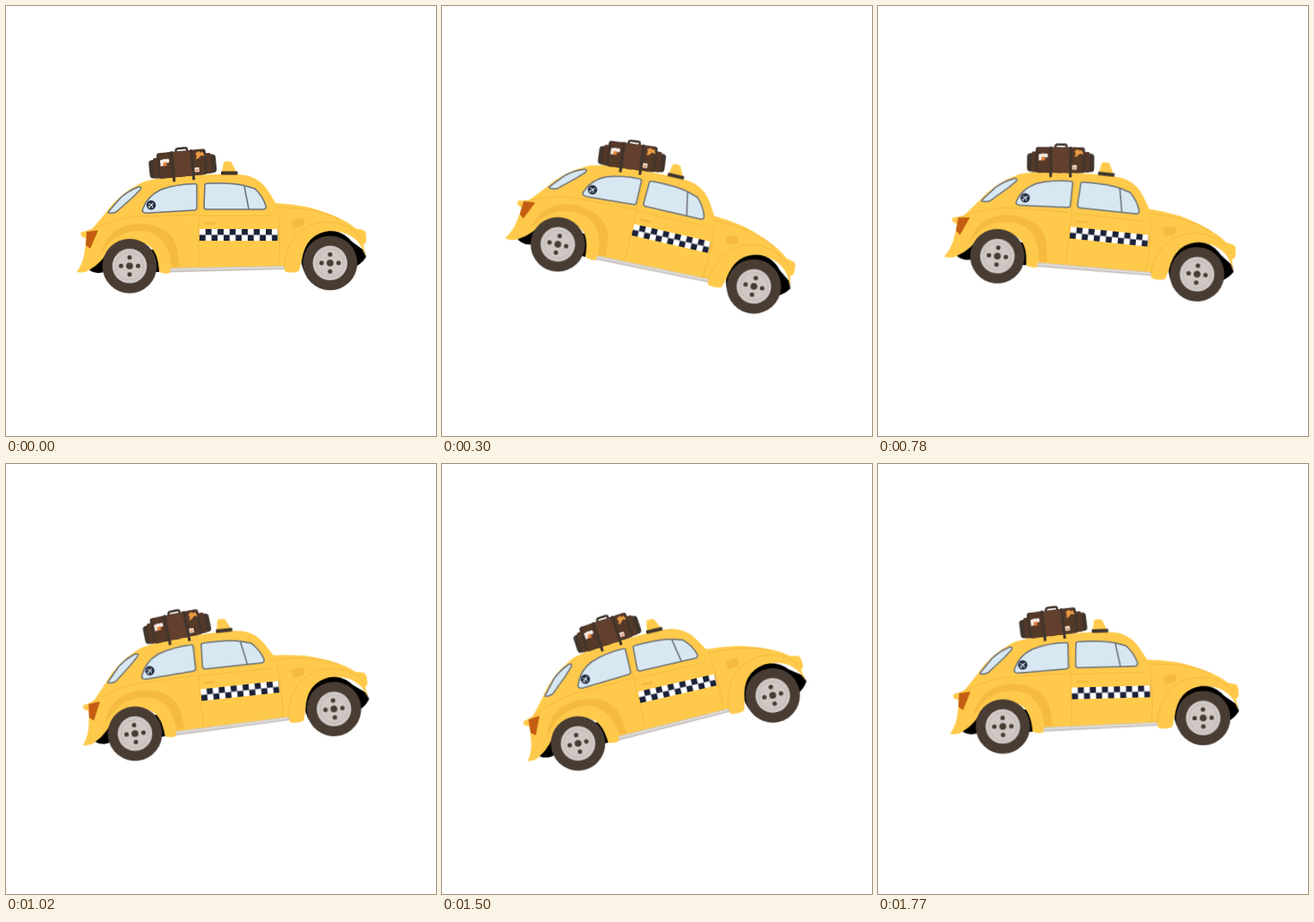
Write an HTML page that moves like this. It is 480 by 480 pixels and loops after 1800 ms.

```html
<!DOCTYPE html>
<html lang="en">
<head>
<meta charset="utf-8">
<title>Swaying taxi</title>
<style>
  html, body { margin: 0; width: 100%; height: 100%; overflow: hidden; background: #fff; }
  svg { display: block; width: 100vw; height: 100vh; }

  /* Sine swing between -15 and 15 degrees, starting level */
  #taxi {
    transform-origin: 240px 240px;
    animation: sway 900ms cubic-bezier(.3642, 0, .6358, 1) -450ms infinite alternate;
  }
  @keyframes sway {
    from { transform: rotate(-15deg); }
    to { transform: rotate(15deg); }
  }

  .body { fill: #ffca4b; }
  .shade { fill: #f5ba3e; }
  .seam { fill: none; stroke: #efb43c; stroke-width: .8; }
  .glass { fill: #d8e8f2; stroke: #6c7177; stroke-width: 1.5; stroke-linejoin: round; }
  .tyre { fill: #483c33; }
  .rim { fill: #cfc8c5; }
  .dark { fill: #40352d; }
  .case { fill: #543828; }
</style>
</head>
<body>
<svg viewBox="0 0 480 480">
  <defs>
    <g id="wheel">
      <circle class="tyre" r="30.4"/>
      <circle class="rim" r="19.3"/>
      <circle r="15.5" fill="none" stroke="#bdb5b2" stroke-width=".8"/>
      <g class="tyre">
        <circle r="3.8"/>
        <circle cy="-9.5" r="2.5"/>
        <circle cy="9.5" r="2.5"/>
        <circle cx="-9.5" r="2.5"/>
        <circle cx="9.5" r="2.5"/>
      </g>
    </g>
    <pattern id="checks" x="216" y="249" width="13.46" height="13" patternUnits="userSpaceOnUse">
      <path fill="#fff" d="M0 0h13.46v13H0z"/>
      <path fill="#1b2238" d="M6.73 0h6.73v6.5H6.73zM0 6.5h6.73V13H0z"/>
    </pattern>
  </defs>

  <g id="taxi">
    <!-- wheel wells -->
    <path d="M93 295L108 272H168L174 297H110Q100 300 93 295Z"/>
    <circle cx="361" cy="282" r="31.5"/>
    <path d="M385 262L400 273L402 280Q397 288 388 292Z"/>

    <!-- sill -->
    <path fill="#cbc6c3" d="M180 291L314 288V294L182 297.5Z"/>
    <path fill="none" stroke="#eeeae8" d="M183 294.3L312 291.5"/>

    <path class="body" d="M79 297Q87 286 88 272L90 260L84 257Q82 252 87 252L96 249
      Q103 241 112 230Q126 210 150 198Q165 190 235 188Q262 187 272 190Q286 195 293 207L301 220
      Q333 221 361 232Q383 241 390 248L399 250Q402 251 402 258Q403 265 399 266L401 279
      Q393 251 361 251Q334 254 330 285L327 296Q318 299 311 296V290L184 292.5L183 298
      Q178 300 171 297Q170 275 160 268Q138 254 116 270Q108 286 94 294Q88 299 79 297Z"/>

    <!-- fenders and seams -->
    <path class="shade" d="M105 279Q113 243 151 243Q185 245 191 271L194 291L185 292Q181 251 149 251Q120 251 105 279Z"/>
    <path class="seam" d="M95 250Q125 236 149 235L213 233"/>
    <path class="seam" d="M215 198V291M304 232Q307 265 304 290M216 234H297"/>
    <path class="seam" d="M302 225Q345 224 373 238M310 292Q315 246 356 241Q385 241 397 260"/>
    <rect class="shade" x="221" y="241" width="13" height="3" rx="1.5"/>
    <path class="shade" d="M319 239Q326 236 333 237V244Q328 248 320 247Z"/>
    <path fill="#c45c12" d="M90 252L103 250.5L94 271L89 267Z"/>

    <!-- windows -->
    <path class="glass" d="M115 229L128 214Q137 206 148 202Q152 201.500 150 205L141 214L123 230Q118 232 115 231Q113 231 115 229Z"/>
    <path class="glass" d="M153 226Q158 212 173 205Q190 199 210 198.500Q213 198 213 201V225Q213 228 210 228L160 231Q150 232 153 226Z"/>
    <path class="glass" d="M222 200Q222 198 225 198Q253 197 268 201L278 204Q287 213 290 223Q291 227 286 227H224Q221 227 221 224Z"/>
    <path class="glass" d="M266 201L271 227"/>

    <!-- plane sticker -->
    <g transform="translate(162 222.300) rotate(45)">
      <circle r="5.2" fill="#252c40"/>
      <path fill="none" stroke="#dce8f0" d="M0-3.500V3.200M-3.300 1L0-1L3.300 1M-1.400 3.200H1.400"/>
    </g>

    <rect x="216" y="249" width="87.500" height="13" fill="url(#checks)"/>

    <use href="#wheel" x="138" y="290.300"/>
    <use href="#wheel" x="361.800" y="286.800"/>

    <!-- roof sign -->
    <path class="body" d="M241 185L243 174.500Q243 173.500 245 173.500H250Q251.500 173.500 252 175L257 185Z"/>
    <rect class="dark" x="240" y="184.500" width="18.500" height="4" rx=".8"/>

    <!-- luggage -->
    <g transform="translate(-6.600 3.800) rotate(-5.500 203.500 172)">
      <path fill="none" stroke="#40352d" stroke-width="2.400" d="M197.500 159V156.500Q198 155 200 155H208Q210 155 210 156.500V159"/>
      <rect class="dark" x="166" y="165" width="75" height="20.500" rx="4"/>
      <rect class="case" x="171" y="163" width="65" height="23" rx="2"/>
      <rect class="dark" x="175.500" y="158" width="55" height="28.500" rx="3"/>
      <rect class="case" x="178" y="158.500" width="50" height="28"/>
      <path fill="#62402d" d="M194 158.500H213.500V186.500H194Z"/>
      <path class="dark" d="M191 157.500h3v34h-3zM213 157.500h3v34h-3z"/>
      <path fill="#f7eee8" d="M179 166l6-1v7l-6 1zM216.500 178h5v5h-5z"/>
      <circle cx="187" cy="167.500" r="2.300" fill="#f7eee8"/>
      <path fill="#e58136" d="M182 169h4v4h-4zM217.500 180h3v2h-3z"/>
      <path fill="#e99a43" d="M219 162l4-2 2 2 2-1 2 5-4-1-3 3-3 1 1-4z"/>
    </g>
  </g>
</svg>
</body>
</html>
```
